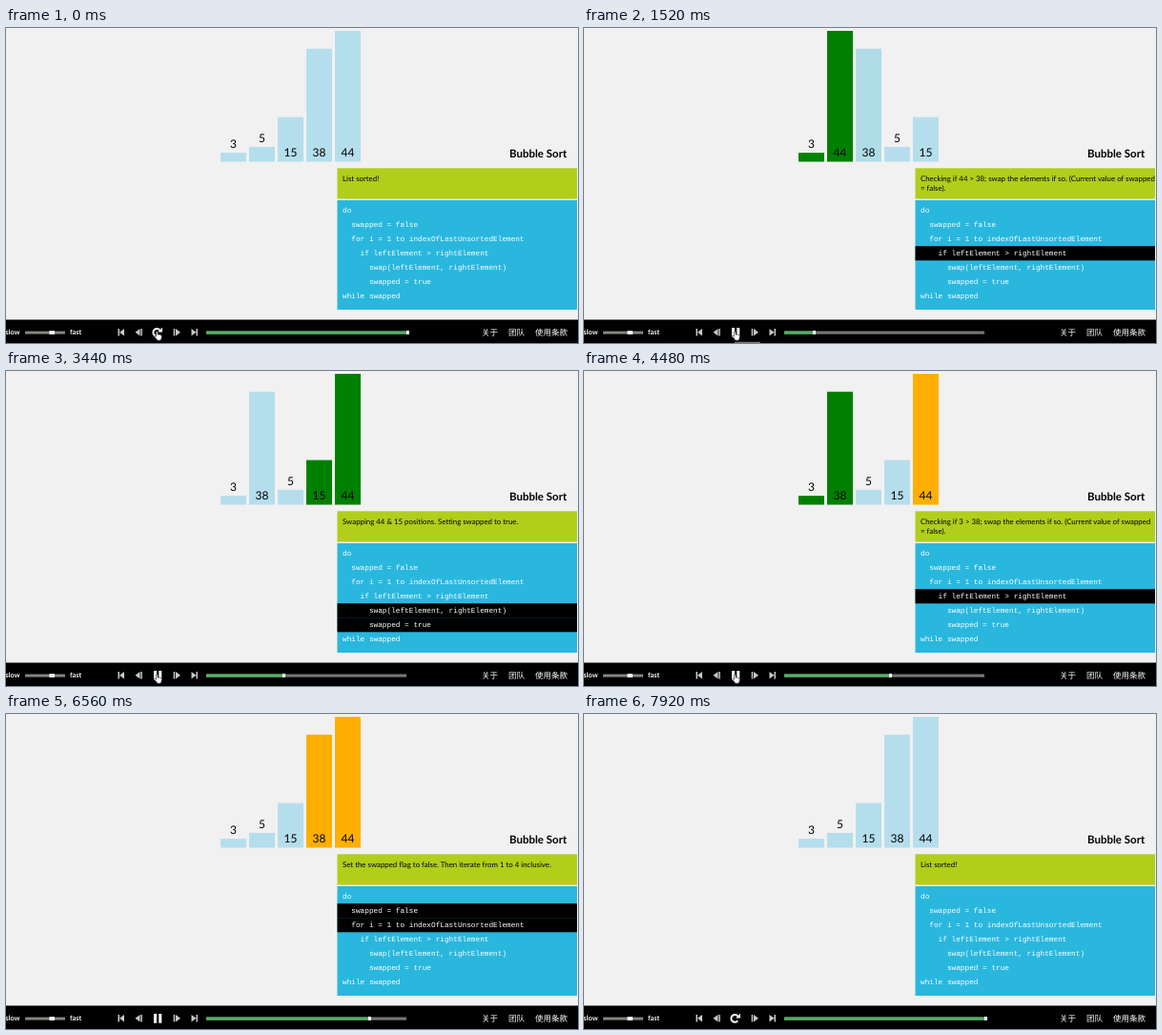
An HTML page for the animation above (8000 ms loop, 600 by 331 pixels).

```html
<!DOCTYPE html>
<html lang="en">
<head>
<meta charset="utf-8">
<title>Bubble Sort</title>
<style>
  html, body { margin: 0; width: 100%; height: 100%; overflow: hidden; background: #f1f1f1; }
  svg { display: block; width: 600px; height: 331px; }
  text { font-family: Lato, sans-serif; text-rendering: geometricPrecision; }
  .label { font-size: 12px; text-anchor: middle; }
  .title { font-size: 11.5px; font-weight: 700; }
  .status { font-size: 7.85px; }
  .code text { font: 7.75px "Liberation Mono", monospace; fill: #fff; }
  .small { font-size: 7.3px; font-weight: 700; fill: #fff; }
  .links { font: 500 8.5px "Noto Sans CJK SC", "Noto Sans CJK", sans-serif; fill: #fff; }
</style>
</head>
<body>
<svg id="stage" viewBox="0 0 600 331">
  <rect width="600" height="331" fill="#f1f1f1"/>
  <g id="bars"></g>
  <text class="title" x="528" y="136.3">Bubble Sort</text>
  <rect x="347.5" y="147.3" width="251.5" height="32.2" fill="#b1ce1a"/>
  <text class="status" id="line1" x="353" y="160.8"></text>
  <text class="status" id="line2" x="353" y="171.3"></text>
  <rect x="347.5" y="181" width="251.5" height="115" fill="#29b7de"/>
  <g class="code" id="code"></g>

  <rect y="306.5" width="600" height="24.5" fill="#000"/>
  <text class="small" x="-.5" y="322.3">slow</text>
  <text class="small" x="67" y="322.3">fast</text>
  <rect x="20" y="318.6" width="42" height="3" fill="#85857f"/>
  <rect x="45.5" y="318.2" width="5.5" height="3.8" fill="#fff"/>
  <g fill="#c8c8c8">
    <path d="M117.5 316h1.5v7.5h-1.5zM124 316v7.5l-5-3.75z"/>
    <path d="M140.5 316v7.5l-5-3.75zM141.3 316h1.5v7.5h-1.5z"/>
    <path d="M178 316v7.5l5-3.75zM175.7 316h1.5v7.5h-1.5z"/>
    <path d="M194.5 316v7.5l5-3.75zM199.5 316h1.5v7.5h-1.5z"/>
  </g>
  <path id="pause" d="M155 315h3v9.8h-3zM160.3 315h3v9.8h-3z" fill="#fff"/>
  <g id="replay">
    <path d="M161.3 322.4a3.9 3.9 0 1 1 0-5" fill="none" stroke="#fff" stroke-width="1.9"/>
    <path d="M164 314.8v4.8h-4.8z" fill="#fff"/>
  </g>
  <rect x="210" y="318.5" width="210" height="3.2" fill="#757575"/>
  <rect id="fill" x="210" y="318.5" height="3.2" fill="#52ae65"/>
  <rect id="thumb" y="318" width="3" height="4" fill="#fff"/>
  <g class="links">
    <text x="499" y="322.5">关于</text>
    <text x="527" y="322.5">团队</text>
    <text x="555" y="322.5">使用条款</text>
  </g>
  <rect id="tip" x="158" y="329.8" width="27" height="1.2" fill="#777"/>
  <path id="hand" fill="#fff" stroke="#222" stroke-width=".6" stroke-linejoin="round"
    d="M157.4 319.2q.8-.9 1.6 0l.3 3 1.1-.1 1.2.4 1.2.3.7 1-.5 2.6-.9 1.8h-3.3l-1.8-2.4-1.6-1.9q.2-1.1 1.3-.5l1 .8z"/>
</svg>
<script>
const LOOP = 8000, FIRST = 130, PLAY = 800, STEP = 340, EASE_TIME = 220;
const BLUE = [181, 222, 237], GREEN = [0, 128, 0], ORANGE = [255, 175, 0];
const CODE = [
  'do',
  '  swapped = false',
  '  for i = 1 to indexOfLastUnsortedElement',
  '    if leftElement > rightElement',
  '      swap(leftElement, rightElement)',
  '      swapped = true',
  'while swapped'
];
const $ = id => document.getElementById(id);

function add(parent, tag, attrs, text = '') {
  const el = document.createElementNS('http://www.w3.org/2000/svg', tag);
  for (const key in attrs) el.setAttribute(key, attrs[key]);
  el.textContent = text;
  parent.append(el);
  return el;
}

// Run the sort once and record every step.
function record(list) {
  const steps = [], sorted = [];
  const push = (text, rows = [], active = []) => {
    const bars = {};
    list.forEach((v, i) => bars[v] = {
      x: 225 + 30 * i,
      color: active.includes(v) ? GREEN : sorted.includes(v) ? ORANGE : BLUE
    });
    steps.push({ text: text.split('\n'), rows, bars });
  };
  push('');
  let swapped, end = list.length - 1;
  do {
    swapped = false;
    push('Set the swapped flag to false. Then iterate from 1 to 4 inclusive.', [1, 2]);
    for (let i = 0; i < end; i++) {
      const [a, b] = list.slice(i, i + 2);
      push(`Checking if ${a} > ${b}; swap the elements if so. (Current value of swapped\n= ${swapped}).`, [3], [a, b]);
      if (a > b) {
        list[i] = b;
        list[i + 1] = a;
        swapped = true;
        push(`Swapping ${a} & ${b} positions. Setting swapped to true.`, [4, 5], [a, b]);
      }
    }
    sorted.push(list[end--]);
    push(swapped
      ? 'Mark last unsorted element as sorted now. As at least one swap is done in\nthis pass, we continue.'
      : 'No swap is done in this pass. We can terminate Bubble Sort now.', [6]);
  } while (swapped);
  sorted.length = 0;
  push('List sorted!');
  return steps;
}

const values = [3, 44, 38, 5, 15];
const steps = record([...values]);
const last = steps.length - 1;

const bars = values.map(value => {
  const group = add($('bars'), 'g', {}), height = value * 3.125, top = 140.5 - height;
  const rect = add(group, 'rect', { y: top, width: 27, height });
  add(group, 'text', { class: 'label', x: 13.5, y: value < 10 ? top - 5 : 135.2 }, value);
  return { value, group, rect };
});

const rows = CODE.map((line, i) => {
  const y = 184.2 + 15 * i, indent = line.search(/\S/);
  const back = add($('code'), 'rect', { x: 347.5, y, width: 251.5, height: 15.1, fill: '#000' });
  add($('code'), 'text', { x: 353 + indent * 4.65, y: y + 9.8 }, line.trim());
  return back;
});

const ease = p => p < .5 ? 4 * p ** 3 : 1 - 4 * (1 - p) ** 3;
const mix = (a, b, p) => a + (b - a) * p;
const show = (el, on) => el.setAttribute('visibility', on ? 'visible' : 'hidden');
const startOf = n => n ? PLAY + STEP * (n - 1) : FIRST;

function stepAt(t) {
  if (t < FIRST) return last;
  if (t < PLAY) return 0;
  return Math.min(last, 1 + Math.floor((t - PLAY) / STEP));
}

function draw(t) {
  const n = stepAt(t), now = steps[n], before = steps[n ? n - 1 : last];
  const p = t < FIRST ? 1 : ease(Math.min(1, (t - startOf(n)) / EASE_TIME));

  for (const { value, group, rect } of bars) {
    const a = before.bars[value], b = now.bars[value];
    group.setAttribute('transform', `translate(${mix(a.x, b.x, p)})`);
    rect.setAttribute('fill', `rgb(${a.color.map((c, i) => Math.round(mix(c, b.color[i], p)))})`);
  }
  rows.forEach((row, i) => show(row, now.rows.includes(i)));
  $('line1').textContent = now.text[0];
  $('line2').textContent = now.text[1] || '';

  $('fill').setAttribute('width', 10 * n);
  $('thumb').setAttribute('x', 210 + 10 * n);
  show($('pause'), n < last);
  show($('replay'), n === last);

  show($('tip'), t >= 1300 && t < 2600);
  show($('hand'), t < 6300);
  $('hand').setAttribute('transform', `translate(0 ${Math.max(0, t - 6000) / 20})`);
}

const origin = performance.now();
function tick() {
  draw((performance.now() - origin) % LOOP);
  requestAnimationFrame(tick);
}
tick();
</script>
</body>
</html>
```
